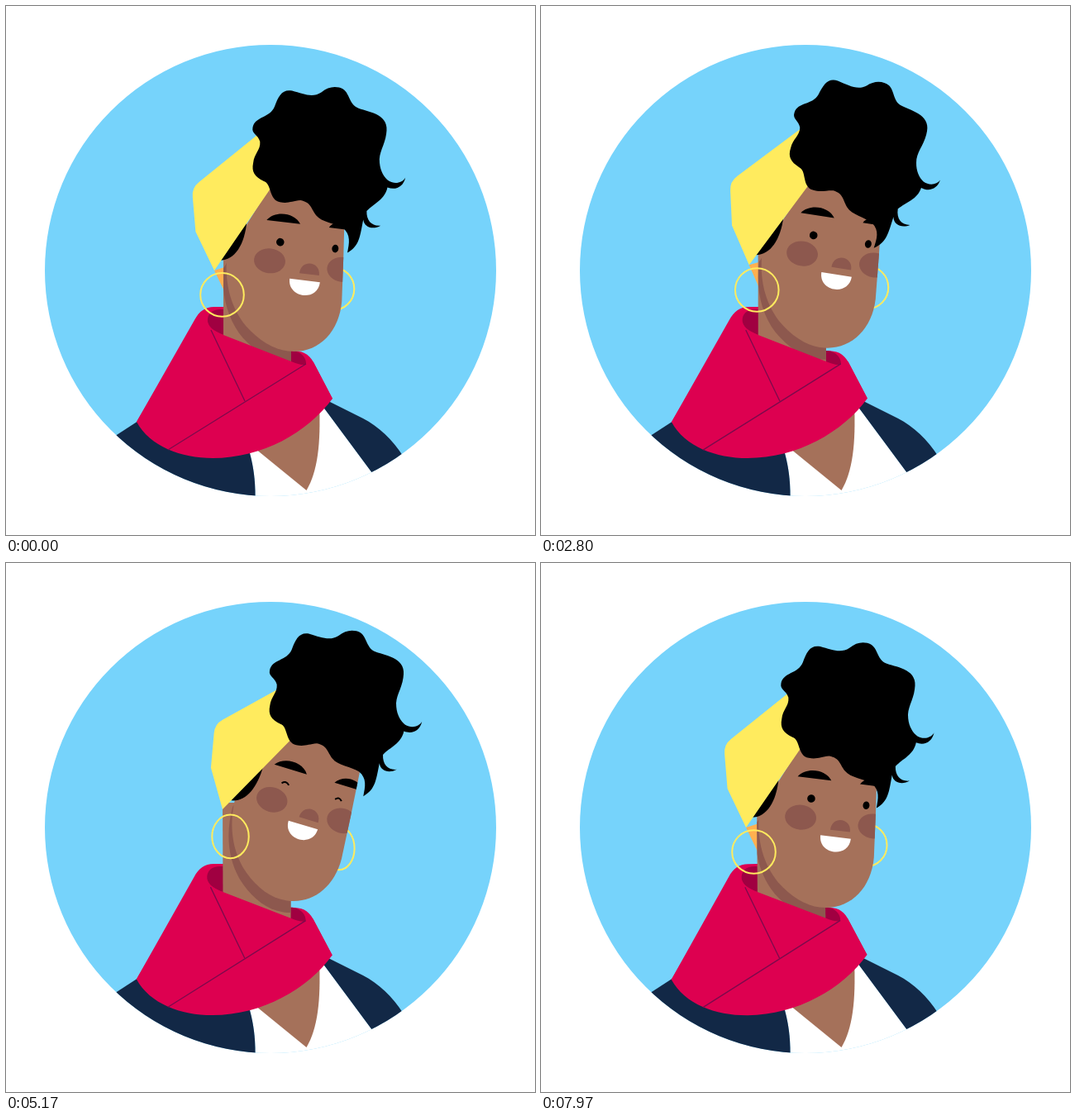
An HTML page with a canvas that plays this animation: 640x640 px, repeating every 8 s.

```html
<!DOCTYPE html>
<html lang="en">
<head>
<meta charset="utf-8">
<title>Portrait</title>
<style>
  html, body { margin: 0; width: 100%; height: 100%; overflow: hidden; background: #fff; }
  canvas { display: block; width: 640px; height: 640px; }
</style>
</head>
<body>
<canvas width="640" height="640"></canvas>
<script>
const ctx = document.querySelector('canvas').getContext('2d');
const LOOP = 8000;
const SKY = '#76d3fb', NAVY = '#122846', RED = '#dd0050', WINE = '#a00041', SEAM = '#7c0a4c';
const SKIN = '#a5715a', SHADE = '#8d584e', YELLOW = '#ffeb5e', ORANGE = '#ffb050';

const shape = d => new Path2D(d);
const art = {
  disc: shape('M47,320a273,273 0 1 0 546,0a273,273 0 1 0 -546,0Z'),
  jacketLeft: shape('M120,528 L160,502 L280,530 L295,541 C300,560 302,577 301.5,600 L120,600Z'),
  jacketRight: shape('M380,473 L392,479 L432,499 C450,508 468,525 480,544 L490,600 L468,600 L443,565 L380,480Z'),
  shirt: shape('M280,530 L295,541 C300,560 302,577 301.5,600 L468,600 L443,565 L380,480Z'),
  chest: shape('M296,531 L363.5,586 C377,563 381,530 379,480Z'),
  scarfBack: shape('M158,503 L228,380 C234,369 241,364 252,364 L264,364 L345,417 C358,417 366,420 372,431 L395,475Z'),
  scarfInside: shape('M272,367 L263,367 C250,366 243,372 244,382 C245,390 255,395 263,398 L272,400Z' +
    'M340,417 L347,417 C358,418 364,427 363,434 Q358,436 340,430Z'),
  scarfFront: shape('M158,503 L236,370 L244,383 C247,391 254,394 263,398 L345,430 Q356,435 363,434 Q365,428 358,419' +
    'L372,431 L395,475 C365,516 310,547 250,547 C212,547 174,533 158,503Z'),
  seams: shape('M248,392 L289,478 M196,537 L363,433'),
  neck: shape('M263,290 H345 V434 L263,402Z'),
  head: shape('M243,318 C244,352 256,380 276,399 C293,414 312,423 330,423 C365,423 389,394 387.5,355' +
    'L383,300 L377,235 L350,222 L286,226Z'),
  bandBack: shape('M235,335 L250,328 L262,350 L253,363Z'),
  band: shape('M235,335 L207,291 L198.5,250 Q196,239 204,231 L280,153 L300,211Z'),
  sideburn: shape('M240,322 C258,320 268,300 267,270Z'),
  brows: shape('M269,274 C278,261 302,261 310,274Z M345,274 C353,261 374,261 381,274Z'),
  nose: shape('M316,333 C316,315.5 340,315.5 340,333Z'),
  mouth: shape('M305,341 H342 C342,365 305,365 305,341Z'),
  closedEyes: shape('M284,300 Q288.5,295 293,300 M351.5,300 Q355.5,295 359.5,300'),
  hair: shape('M226,172 C226,158 244,157 247,142 C249,128 252,119 264,119 C278,120 290,123 299,114' +
    'C305,107 311,104 319,104 C333,104 333,122 347,124 C362,126 386,124 386,148 C387,162 381,172 385,184' +
    'C388,194 394,200 400,203 C408,206 417,202 419,195 C419,206 411,213 400,211 C400,226 388,233 381,244' +
    'C383,256 391,261 401,258 C393,265 382,264 379,255 C379,275 381,287 368,298 C368,286 368,276 357,270' +
    'C347,266 330,268 322,261 C314,254 313,247 300,247 C290,250 286,254 276,254 C262,254 262,234 252,233' +
    'C240,230 235,225 235,214 C234,202 241,197 238,187 C234,179 226,180 226,172Z')
};

// Rest positions around which each part turns.
const REST = { face: [323.5, 341], head: [330, 365], band: [235, 335], hair: [369, 150], body: [278, 540] };

// time, head angle, hair angle, face x y, head x y, band x y, hair x y, body sway
const lean = [-6.8, -8, 318.5, 336.5, 327, 363, 231, 345, 341, 137.5, 2];
const poses = [
  [0, 6.8, 11.3, 361.5, 332, 348, 360, 252, 320, 443, 153.5, 0],
  [900, ...lean],
  [1800, ...lean],
  [2230, 0, 0, 323.5, 341, 330, 365, 235, 335, 369, 150, 1.6],
  [2560, 8.8, 17.5, 356, 326, 346, 356, 251, 314, 447, 152.5, 0],
  [3430, 9.5, 18.5, 360, 323, 347, 355, 253, 312, 453, 150.5, -.5],
  [4215, 15, 18, 366, 308, 350, 348, 261, 296, 470, 132.5, -.7],
  [5050, 16.8, 14, 363, 313, 349, 349, 262, 296, 471, 131, -.6],
  [5170, 16.8, 11.8, 359.5, 317, 348, 351, 262, 298, 463.5, 137.5, -.5],
  [5900, 17, 19, 358, 324, 348, 355, 263, 300, 468, 156, 1],
  [6830, 16.6, 19.6, 353.5, 328.5, 348, 357, 262, 302, 461.5, 160.5, 1.6],
  [7600, 7.8, 11.5, 359, 331, 346, 359.5, 250, 319, 441.5, 152.5, -.6],
  [7970, 7, 11, 356.5, 331.5, 344.5, 359, 248, 320, 435, 151.5, -1]
];

const slope = (i, c) => (poses[i + 1][c] - poses[i][c]) / (poses[i + 1][0] - poses[i][0]);

// Monotone tangent: flat at the ends and at turning points.
function tangent(i, c) {
  if (i === 0 || i === poses.length - 1) return 0;
  const a = slope(i - 1, c), b = slope(i, c);
  return a * b > 0 ? 2 * a * b / (a + b) : 0;
}

function poseAt(t) {
  const last = poses.length - 1;
  if (t >= poses[last][0]) return poses[last];
  const i = poses.findIndex(p => p[0] > t) - 1;
  const span = poses[i + 1][0] - poses[i][0], u = (t - poses[i][0]) / span;
  return poses[i].map((a, c) => {
    const b = poses[i + 1][c];
    return a + (b - a) * u * u * (3 - 2 * u)
      + span * u * (1 - u) * ((1 - u) * tangent(i, c) - u * tangent(i + 1, c));
  });
}

function place(part, x, y, degrees) {
  const [restX, restY] = REST[part];
  ctx.setTransform(1, 0, 0, 1, x, y);
  ctx.rotate(degrees * Math.PI / 180);
  ctx.translate(-restX, -restY);
}

function fill(path, color) {
  ctx.fillStyle = color;
  ctx.fill(path);
}

function stroke(path, color, width) {
  ctx.strokeStyle = color;
  ctx.lineWidth = width;
  ctx.stroke(path);
}

function oval(x, y, rx, ry) {
  const path = new Path2D();
  path.ellipse(x, y, rx, ry, 0, 0, 7);
  return path;
}

function clipped(path, draw) {
  ctx.save();
  ctx.clip(path);
  draw();
  ctx.restore();
}

function drawFace(blink) {
  fill(oval(278.5, 322.5, 19, 15), SHADE);
  fill(oval(367, 322.5, 18.5, 15), SHADE);
  fill(art.nose, SHADE);
  fill(art.mouth, '#fff');
  if (blink) {
    stroke(art.closedEyes, '#000', 2);
    ctx.translate(0, 7);
  } else {
    fill(oval(288.5, 298.5, 4.8, 4.8), '#000');
    fill(oval(355.5, 298.5, 4, 4.8), '#000');
  }
  fill(art.brows, '#000');
}

function draw(t) {
  const [, tilt, hairTilt, faceX, faceY, headX, headY, bandX, bandY, hairX, hairY, sway] = poseAt(t);
  const blink = t >= 5060 && t < 5260;
  const narrow = Math.max(0, tilt - 10);
  const identity = () => ctx.setTransform(1, 0, 0, 1, 0, 0);
  const onBody = () => place('body', ...REST.body, sway * .45);
  const onHead = (dx = 0, dy = 0) => place('head', headX + dx, headY + dy, tilt);
  const onBand = () => place('band', bandX, bandY, tilt);

  identity();
  ctx.fillStyle = '#fff';
  ctx.fillRect(0, 0, 640, 640);
  fill(art.disc, SKY);
  clipped(art.disc, () => {
    fill(art.shirt, '#fff');
    fill(art.jacketLeft, NAVY);
    fill(art.jacketRight, NAVY);
    fill(art.chest, SKIN);
  });

  onBody();
  fill(art.scarfBack, RED);
  fill(art.scarfInside, WINE);

  onHead(-.6 * (faceX - headX + 6.5));
  fill(oval(381, 298, 11, 14), SHADE);
  identity();
  const farWidth = 26 - narrow * 1.1;
  const farX = headX + 79 - .15 * (faceX - REST.face[0]) - farWidth;
  stroke(oval(farX, headY - 26 + 1.2 * tilt, farWidth, 26), YELLOW, 2);

  onBand();
  fill(art.bandBack, ORANGE);
  onBody();
  fill(art.neck, SKIN);
  clipped(art.neck, () => {
    onHead(-4, 14);
    fill(art.head, SHADE);
  });
  onBody();
  fill(art.scarfFront, RED);
  stroke(art.seams, SEAM, 1.3);

  onHead();
  fill(art.head, SKIN);
  clipped(art.head, () => {
    place('face', faceX, faceY, tilt);
    drawFace(blink);
  });

  onBand();
  fill(art.sideburn, '#000');
  fill(art.band, YELLOW);
  place('hair', hairX, hairY, hairTilt);
  fill(art.hair, '#000');

  identity();
  stroke(oval(bandX + 9.5, bandY + 27 + .35 * Math.max(0, tilt), 26.3 - narrow * .6, 26.3), YELLOW, 2);
}

function frame() {
  draw(performance.now() % LOOP);
  requestAnimationFrame(frame);
}
frame();
</script>
</body>
</html>
```
